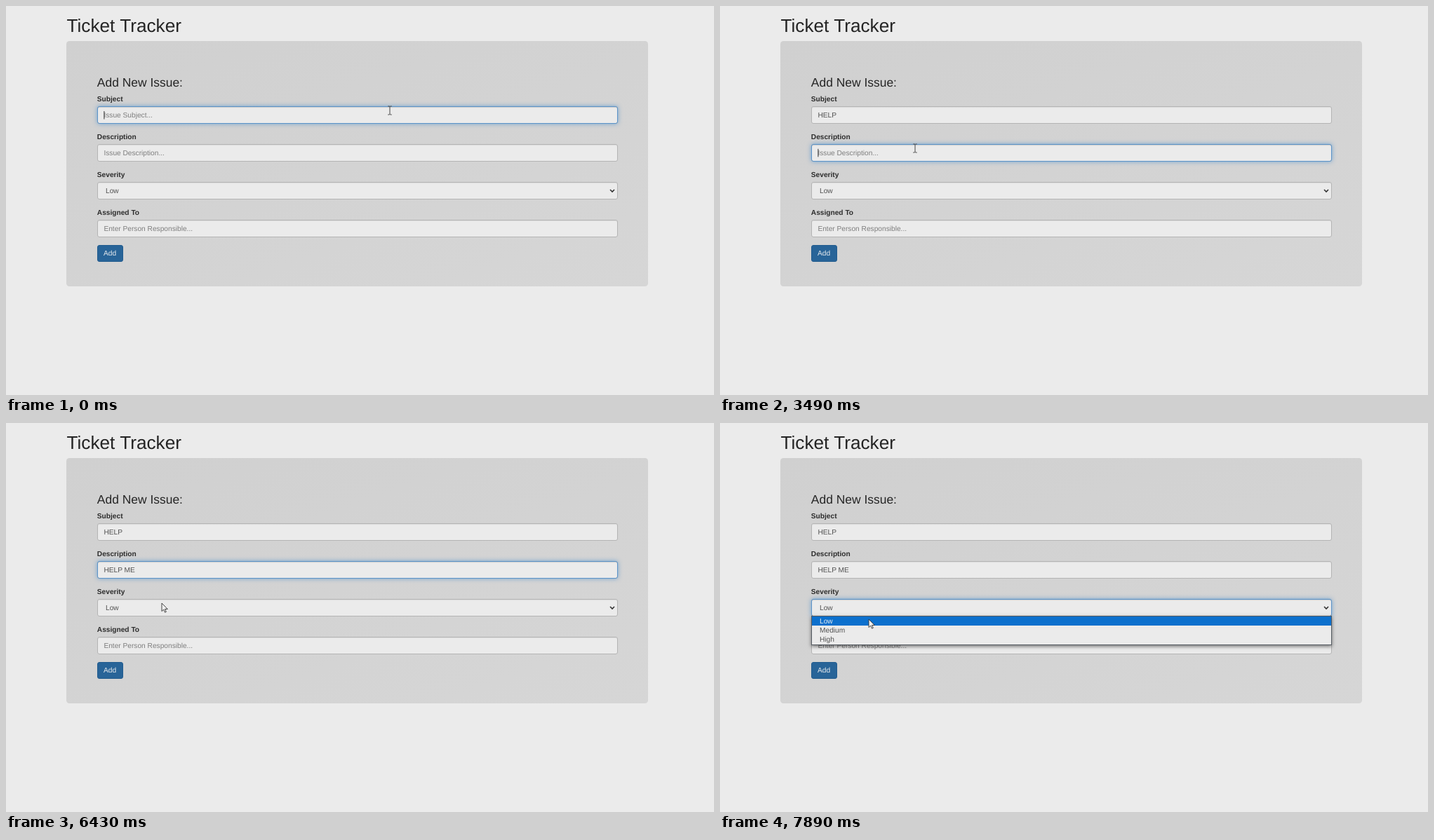
An HTML page for the animation above (8000 ms loop, 1009 by 555 pixels).

```html
<!DOCTYPE html>
<html lang="en">
<head>
<meta charset="utf-8">
<title>Ticket Tracker</title>
<style>
html, body { margin: 0; width: 100%; height: 100%; overflow: hidden; background: #ebebeb; }
#stage { position: relative; width: 1009px; height: 555px; overflow: hidden; background: #ebebeb; }
#stage div, svg { position: absolute; box-sizing: border-box; }
svg { left: 0; top: 0; }
text { font-family: "Liberation Sans", Arial, sans-serif; font-size: 10.18px; text-rendering: geometricPrecision; white-space: pre; }
.panel { left: 86px; top: 50px; width: 829px; height: 350px; border-radius: 4.4px; background: linear-gradient(160deg, #d0d0d0, #d6d6d6); }
.field, .glow { left: 129.5px; width: 742px; height: 25px; border-radius: 3px; }
.field { background: #ebebeb; border: 1px solid #b4b4b4; box-shadow: inset 0 1px 1px rgba(0,0,0,.07); }
.glow { border: 1px solid #5b93c9; box-shadow: 0 0 6px rgba(80,145,205,.75), inset 0 1px 1px rgba(0,0,0,.07); }
.button { left: 129.5px; top: 340.5px; width: 37px; height: 24.5px; border-radius: 3px; background: #286498; border: 1px solid #225c8f; }
.title { font-size: 26.2px; fill: #242424; }
.heading { font-size: 17.45px; fill: #262626; }
.label { font-weight: bold; fill: #2d2d2d; }
.value, .option { fill: #525252; }
.value.empty { fill: #7e7e7e; }
.white { fill: #e9ecef; }
#popup { left: 129.5px; top: 275px; width: 742.5px; height: 42px; border: 1px solid transparent; border-bottom-color: #777; box-shadow: 0 2px 5px rgba(0,0,0,.5); }
#popup.open { border-color: #555b62; background: linear-gradient(#0c70cd 13.5px, #ebebeb 13.5px); }
</style>
</head>
<body>
<div id="stage">
  <div class="panel"></div>
  <div class="button"></div>
  <svg id="copy" width="1009" height="555">
    <text class="title" x="86.5" y="36.8">Ticket Tracker</text>
    <text class="heading" x="129.8" y="114.5">Add New Issue:</text>
    <text class="white" x="148" y="356.4" text-anchor="middle">Add</text>
    <path d="M861 262l3 3 3-3" fill="none" stroke="#333" stroke-width="1.6"/>
    <rect id="caret" width="1" height="11.5" fill="#333"/>
  </svg>
  <div id="popup"></div>
  <svg width="1009" height="555">
    <g id="options">
      <text class="white" x="142" y="286">Low</text>
      <text class="option" x="142" y="299.2">Medium</text>
      <text class="option" x="142" y="312.4">High</text>
    </g>
    <path id="beam" d="M-2.7-6H-.6L0-5.4.6-6H2.7M0-5.4V5.4M-2.7 6H-.6L0 5.4.6 6H2.7" fill="none" stroke="#444" stroke-width="1"/>
    <path id="arrow" d="M0 0V11.6L2.7 9.1 4.5 13.2 6.3 12.4 4.6 8.5H8.3Z" fill="#f0f0f0" stroke="#333" stroke-width=".9"/>
  </svg>
</div>
<script>
const LOOP = 8000, LEFT = 139.4;
const $ = id => document.getElementById(id);
const clamp = v => Math.max(0, Math.min(1, v));

// focus: [start, end]; keys: time of each typed letter
const fields = [
  { label: 'Subject', hint: 'Issue Subject...', text: 'HELP', keys: [410, 620, 830, 1040], focus: [-999, 2230] },
  { label: 'Description', hint: 'Issue Description...', text: 'HELP ME', keys: [4050, 4200, 4460, 4770, 5140, 5670, 5880], focus: [2230, 7480] },
  { label: 'Severity', hint: 'Low', x: 142, focus: [7480, 9999] },
  { label: 'Assigned To', hint: 'Enter Person Responsible...', focus: [9999, 9999] }
];

// [time, x, y] of the pointer's hot spot
const path = [
  [0, 547, 149], [70, 547, 149], [620, 385, 168], [1720, 385, 168], [2200, 278, 203],
  [5880, 278, 203], [6430, 222, 257], [6710, 219, 260], [6920, 219, 260],
  [7100, 217, 262], [7600, 217, 262], [7890, 212, 280], [LOOP, 212, 280]
];

function addText(cls, x, y, content) {
  const el = document.createElementNS('http://www.w3.org/2000/svg', 'text');
  el.setAttribute('class', cls);
  el.setAttribute('x', x);
  el.setAttribute('y', y);
  el.textContent = content;
  $('copy').insertBefore(el, $('caret'));
  return el;
}

function addBox(cls, top) {
  const el = document.createElement('div');
  el.className = cls;
  el.style.top = top + 'px';
  $('stage').insertBefore(el, $('copy'));
  return el;
}

fields.forEach((f, i) => {
  f.top = 143.3 + i * 53.8;
  addBox('field', f.top);
  f.glow = addBox('glow', f.top);
  addText('label', 129.8, f.top - 7.2, f.label);
  f.value = addText('value' + (f.x ? '' : ' empty'), f.x || LEFT, f.top + 16.1, f.hint);
});

function pointerAt(t) {
  const i = Math.max(1, path.findIndex(p => p[0] > t));
  const [t0, x0, y0] = path[i - 1], [t1, x1, y1] = path[i];
  const k = (t - t0) / (t1 - t0), e = k * k * (3 - 2 * k);
  return [x0 + (x1 - x0) * e, y0 + (y1 - y0) * e];
}

function drawField(f, t) {
  const [on, off] = f.focus;
  f.glow.style.opacity = clamp((t - on) / 150) * (1 - clamp((t - off) / 150));
  if (!f.keys) return;
  const typed = f.text.slice(0, f.keys.filter(k => k <= t).length);
  f.value.textContent = typed || f.hint;
  f.value.classList.toggle('empty', !typed);
  if (t < on || t >= off) return;

  const last = Math.max(on, ...f.keys.filter(k => k <= t));
  const blink = f === fields[0] || Math.floor((t - last) / 530) % 2 === 0;
  $('caret').style.visibility = blink && t < 7400 ? 'visible' : 'hidden';
  $('caret').setAttribute('x', LEFT + (typed ? f.value.getComputedTextLength() : 0));
  $('caret').setAttribute('y', f.top + 6.7);
}

function draw(t) {
  $('caret').style.visibility = 'hidden';
  fields.forEach(f => drawField(f, t));

  const open = t >= 7540;
  $('popup').style.display = t >= 7400 ? 'block' : 'none';
  $('popup').classList.toggle('open', open);
  $('options').style.display = open ? 'inline' : 'none';

  const [x, y] = pointerAt(t);
  const overText = fields.some(f => !f.x && y >= f.top && y <= f.top + 25);
  for (const id of ['beam', 'arrow']) {
    $(id).setAttribute('transform', `translate(${x} ${y})`);
    $(id).style.display = (id === 'beam') === overText ? 'inline' : 'none';
  }
}

const start = performance.now();
function tick() {
  draw((performance.now() - start) % LOOP);
  requestAnimationFrame(tick);
}
tick();
</script>
</body>
</html>
```
